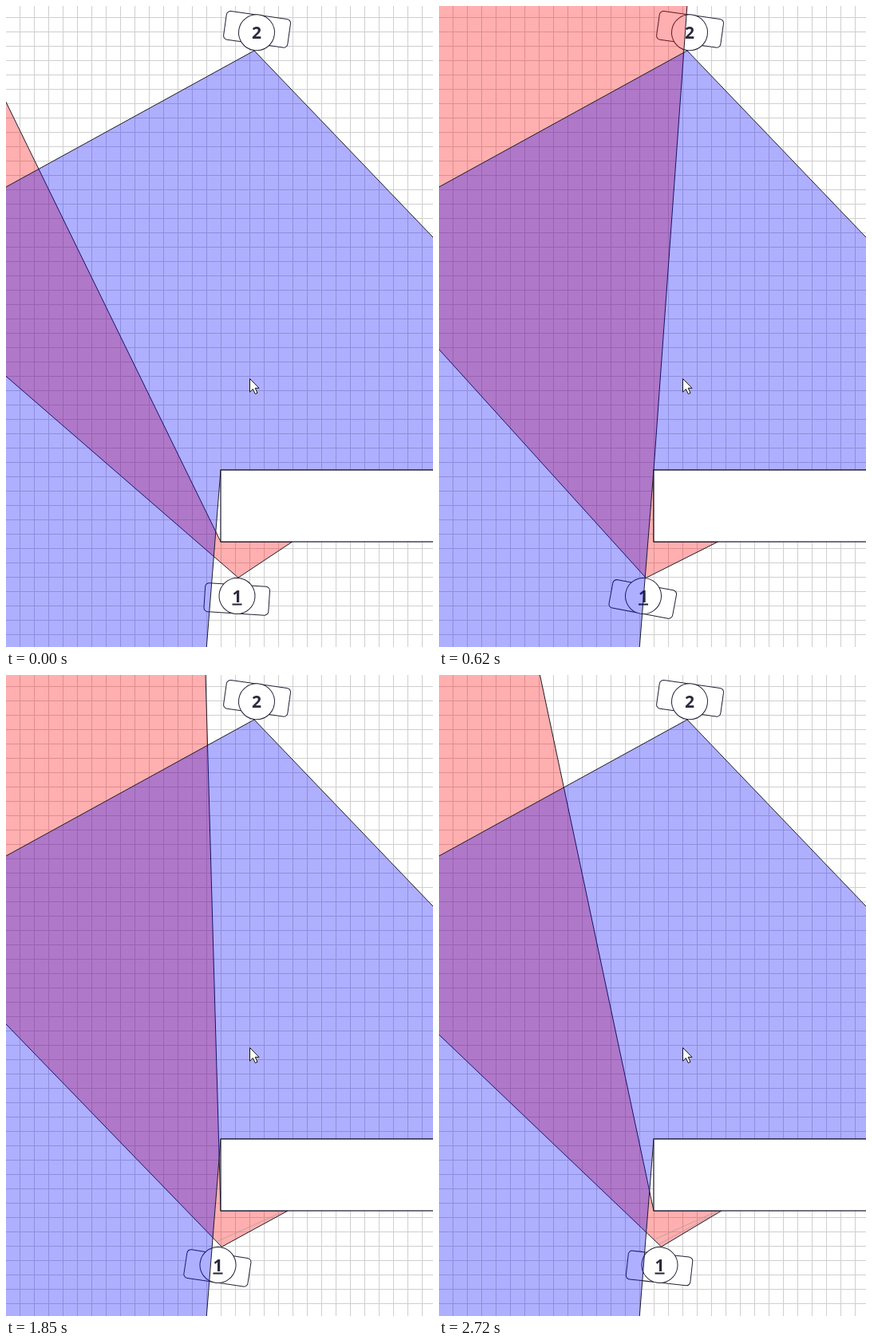
Animation of 535x804 px, one loop 2.79 s. Source, as an HTML page:

```html
<!DOCTYPE html>
<html lang="en">
<head>
<meta charset="utf-8">
<title>Sight cones</title>
<style>
  html, body { margin: 0; width: 100%; height: 100%; overflow: hidden; background: #fff; }
  svg { display: block; width: 100vw; height: 100vh; }
  .cone { stroke: #1c1c2a; stroke-width: 1; }
  .red { fill: rgba(255, 0, 0, .315); }
  .blue { fill: rgba(0, 0, 255, .315); }
  .badge { fill: #fff; stroke: #222236; stroke-width: 1; }
  .ghost { fill: none; stroke: #a99; stroke-width: 1; opacity: .65; }
  text { font: bold 21px "Noto Sans", "Open Sans", sans-serif; fill: #2b2a3c; text-anchor: middle; }
</style>
</head>
<body>
<svg viewBox="0 0 535 804">
  <defs>
    <pattern id="grid" x="17" y="14" width="18" height="18" patternUnits="userSpaceOnUse">
      <path d="M0 .5H18M.5 0V18" stroke="#cfcfcf"/>
    </pattern>
    <g id="plate" class="badge">
      <rect x="-40.5" y="-14" width="81" height="36" rx="5"/>
      <circle r="22.5"/>
    </g>
    <clipPath id="inCone"><path id="clip"/></clipPath>
  </defs>
  <rect width="535" height="804" fill="url(#grid)"/>

  <use href="#plate" transform="translate(314 33.3) rotate(188)"/>
  <text x="314" y="41">2</text>
  <g id="walker">
    <use id="walkerPlate" href="#plate"/>
    <text y="7.5" text-decoration="underline">1</text>
  </g>

  <path id="redCone" class="cone red"/>
  <g clip-path="url(#inCone)">
    <path id="ghostA" class="ghost" d="M250 717L350 672"/>
    <path id="ghostB" class="ghost" d="M270 717L353 672"/>
  </g>
  <path class="cone blue" d="M311 56L-2799 1766L229.4 1078L269 582H815L800 567Z"/>
  <rect x="269" y="582" width="300" height="90" fill="#fff" stroke="#15152a" stroke-width="1.2"/>
  <path d="M305.5 467.5V484.2L309.4 480.5L312.3 486.6L315 485.4L312.2 479.3H317Z" fill="#fff" stroke="#111"/>
</svg>
<script>
const LOOP = 2790;
const START_X = 289.5;
const WALKER_Y = 740;
const TIP_DISTANCE = 23;
const HALF_ANGLE = 37.3 * Math.PI / 180;
const TARGET = { x: 307, y: 467 };
const BOX = { left: 269, top: 582, bottom: 672 };

// Each burst of movement: start time, step length, positions
const bursts = [
  [200, 70, [285, 280, 275, 269.5, 264.5, 260, 256, 253]],
  [1090, 70, [248, 243, 239, 236]],
  [1500, 70, [237.5, 243.9, 249, 254.5, 260, 265.5, 270, 272.5]],
  [2250, 67, [277.5, 283, 288, 291, 291, 284, 278.5, 276.5]]
];

const el = id => document.getElementById(id);

function walkerAt(time) {
  let x = START_X, speed = 0;
  for (const [start, step, stops] of bursts) {
    if (time < start) break;
    const index = Math.floor((time - start) / step);
    const last = Math.min(index, stops.length - 1);
    const before = last ? stops[last - 1] : x;
    x = stops[last];
    speed = index > last ? 0 : x - before;
  }
  return { x, speed };
}

function conePath(x, y, tilt) {
  const far = 3000;
  const leftAngle = HALF_ANGLE + tilt;
  const rightX = x + (y - BOX.bottom) / Math.tan(HALF_ANGLE - tilt);
  const pivotY = x > BOX.left ? BOX.bottom : BOX.top;
  const dx = BOX.left - x, dy = pivotY - y;
  const reach = far / Math.hypot(dx, dy);
  const points = [
    [x, y],
    [rightX, BOX.bottom],
    [BOX.left, BOX.bottom],
    [BOX.left, pivotY],
    [x + dx * reach, y + dy * reach],
    [x - far * Math.cos(leftAngle), y - far * Math.sin(leftAngle)]
  ];
  return "M" + points.map(p => p.map(n => n.toFixed(2)).join(" ")).join("L") + "Z";
}

function draw(now) {
  const time = now % LOOP;
  const { x, speed } = walkerAt(time);
  const tilt = Math.atan2(TARGET.x - x, WALKER_Y - TARGET.y);
  // The cone runs slightly ahead of the badge while moving
  const tipX = x + TIP_DISTANCE * Math.sin(tilt) + speed * .24;
  const tipY = WALKER_Y - TIP_DISTANCE * Math.cos(tilt);
  const cone = conePath(tipX, tipY, tilt);

  el("walker").setAttribute("transform", `translate(${x} ${WALKER_Y})`);
  el("walkerPlate").setAttribute("transform", `rotate(${tilt * 180 / Math.PI})`);
  el("redCone").setAttribute("d", cone);
  el("clip").setAttribute("d", cone);
  el("ghostA").style.visibility = time >= 1500 ? "visible" : "hidden";
  el("ghostB").style.visibility = time >= 1990 ? "visible" : "hidden";
}

const began = performance.now();
function tick() {
  draw(performance.now() - began);
  requestAnimationFrame(tick);
}
tick();
</script>
</body>
</html>
```
